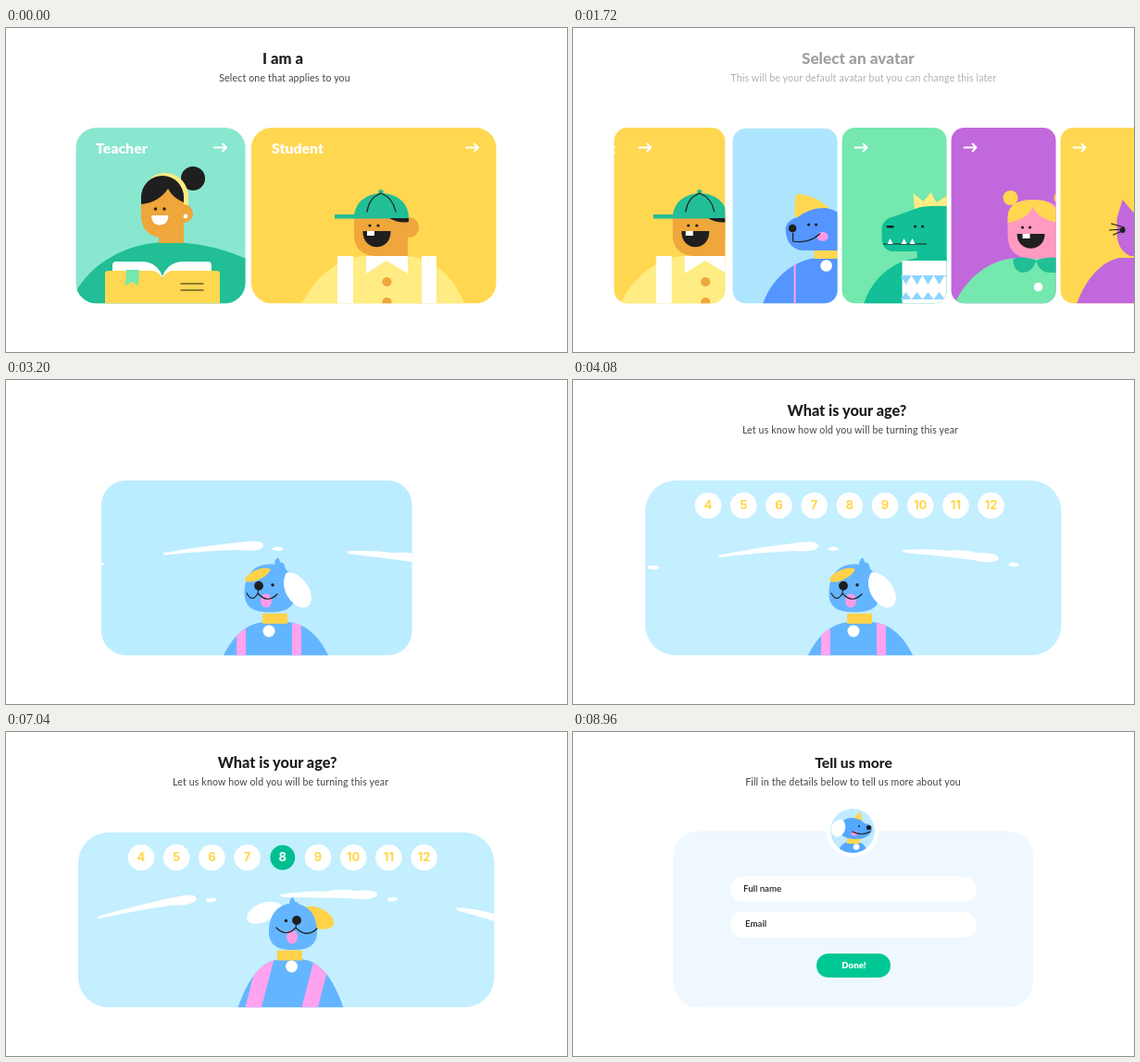
These frames come from a looping animation (606 px wide and 351 px high, 9000 ms). An HTML page:

```html
<!DOCTYPE html>
<html lang="en">
<head>
<meta charset="utf-8">
<title>Onboarding</title>
<style>
html, body { margin: 0; width: 100%; height: 100%; overflow: hidden; background: #fff; }
svg { display: block; width: 606px; height: 351px; font-family: Lato, "Open Sans", sans-serif; }
.title { font-weight: 800; fill: #1c1c1c; text-anchor: middle; }
.sub { font-size: 10.6px; letter-spacing: .15px; fill: #444; text-anchor: middle; }
.role { font-size: 15.8px; font-weight: 900; fill: #fff; }
.num { font: 700 13px Inter, sans-serif; text-anchor: middle; }
.field { font-size: 9.7px; font-weight: 600; fill: #222; }
.done { font-size: 9.6px; font-weight: 900; fill: #fff; text-anchor: middle; }
.line { fill: none; stroke: #1f1f1f; stroke-width: 1.2; stroke-linecap: round; }
.arrow { fill: none; stroke: #fff; stroke-width: 2; stroke-linecap: round; stroke-linejoin: round; }
</style>
</head>
<body>
<svg id="stage" viewBox="0 0 606 351"></svg>
<script>
const LOOP = 9000, SPAN = 1733, STARTS = [463, 2254, 6950];
const INK = '#1f1f1f', SKIN = '#efa63b', GREEN = '#22be95', YELLOW = '#ffd751', BLUE = '#64b5ff';

const clamp = v => Math.max(0, Math.min(1, v));
const lerp = (a, b, p) => a + (b - a) * p;
const ramp = (t, from, to) => clamp((t - from) / (to - from));
const smooth = p => p * p * (3 - 2 * p);
const quart = u => u < .5 ? 8 * u ** 4 : 1 - 8 * (1 - u) ** 4;
const mix = (a, b, p) => `rgb(${a.map((v, i) => Math.round(lerp(v, b[i], p)))})`;

const path = (d, fill) => `<path d="${d}" fill="${fill}"/>`;
const line = d => `<path class="line" d="${d}"/>`;
const dot = (x, y, r, fill = INK, id = '') => `<circle cx="${x}" cy="${y}" r="${r}" fill="${fill}" ${id && `id="${id}"`}/>`;
const box = (x, y, w, h, fill, r = 0) => `<rect x="${x}" y="${y}" width="${w}" height="${h}" rx="${r}" fill="${fill}"/>`;
const oval = (x, y, rx, ry, fill) => `<ellipse cx="${x}" cy="${y}" rx="${rx}" ry="${ry}" fill="${fill}"/>`;
const arrow = id => `<path class="arrow" id="${id}" d="M-6 0H7M3 -4L7 0L3 4"/>`;
const card = (id, fill, art, extra = '') => `
  <clipPath id="clip-${id}"><rect id="mask-${id}"/></clipPath>
  <g clip-path="url(#clip-${id})"><rect id="bg-${id}" y="107" width="606" height="192" fill="${fill}"/>
  <g id="art-${id}">${art}</g>${extra}</g>`;

const teacher = dot(202, 163, 13) +
  path('M66 310C78 258 130 232 172 232C215 232 250 242 290 266V310Z', GREEN) +
  path('M147 182A25 26 0 0 1 197 184V195H150Z', '#ffec82') +
  box(165, 215, 27, 18, SKIN) +
  path('M146 182Q152 168 171 168Q192 170 192 186V227H168Q146 225 146 203Z', SKIN) +
  dot(192, 201, 10, SKIN) + dot(194, 204, 2.4, '#fff') +
  path('M146 191V183A23 23 0 0 1 192 183V189Q180 184 175 174Q165 189 146 191Z', INK) +
  dot(161.5, 196, 1.7) + dot(171, 196, 1.7) +
  path('M157 203H175.5Q175 213.5 166 213.5Q157 213 157 203Z', '#fff') +
  path('M115 270V257Q115 253 119 253H146Q163 253 169 269Q175 253 192 253H218Q222 253 222 257V270Z', '#fff') +
  path('M107 300V266Q107 263 110 263H159Q165 264 169 271Q173 264 179 263H228Q231 263 231 266V300Z', YELLOW) +
  path('M130 262H144L143 279L136 275L129 279Z', '#74e8ae') +
  line('M189 277H213M189 284H213');

const student = path('M318 301C337 263 365 247 390 247H430C460 247 485 270 496 301Z', '#ffec82') +
  box(358, 247, 17, 53, '#fff') + box(449, 247, 16, 53, '#fff') +
  dot(435, 216, 11, SKIN) +
  path('M376 200H434V247H398Q376 245 376 224Z', SKIN) +
  path('M389 247H434V266L411 252L389 266Z', '#fff') +
  dot(411.5, 275, 5, SKIN) + dot(411.5, 297, 5, SKIN) +
  path('M414 206H435V210Q425 212 414 206Z', INK) +
  path('M376 206C376 170 435 170 435 206Z', GREEN) + box(355, 202, 60, 4.5, GREEN) + dot(405, 177.5, 2.6, GREEN) +
  line('M390 199Q392 184 405 179Q418 184 421 199') +
  dot(393, 214, 1.6) + dot(402, 214, 1.6) +
  path('M385.5 220H415.5C416 243 385 243 385.5 220Z', INK) + box(390, 220, 8, 5, '#fff');

const sideDog = path('M186 300C196 270 222 250 246 249H272C300 252 320 270 330 300Z', '#5595ff') +
  box(220, 255, 2, 44, '#ffa3f0') + box(268, 252, 2, 47, '#ffa3f0') +
  box(242, 238, 31, 12, YELLOW) + dot(255, 257.5, 6.3, '#fff') +
  path('M221 205Q220 186 223 180Q242 180 258 195L244 206Z', YELLOW) +
  path('M211 216Q213 208 224 205Q238 194 254 195Q276 198 277 220V241H228Q211 238 211 216Z', '#5595ff') +
  oval(251, 226, 6, 5, '#ff9be6') + line('M219 222V231Q236 234 248 223') +
  dot(218.5, 217, 4.3) + dot(236, 213, 1.6) + dot(244, 213, 1.6) +
  oval(277, 213, 9, 18, '#fff');

const zigzag = (y, n) => path(`M366 ${y}` + Array.from({ length: n }, (_, i) => `l6 ${y > 285 ? -8 : 10}l6 ${y > 285 ? 8 : -10}`).join('') + 'Z', '#8fd4ff');
const dino = path('M326 300C336 270 358 252 386 249H440V300Z', '#12bf96') +
  path('M382 206L380 179L391 188L399 178L405 189L417 181V206Z', '#ffec82') +
  path('M346 216Q348 206 360 204L382 196Q390 192 416 193H440V254H384V242H356Q347 240 346 229Z', '#12bf96') +
  path('M368 252H440V300H368Z', '#fff') + zigzag(268, 7) + zigzag(294, 7) +
  line('M348 234H394') +
  path('M352 234l3 -6l3 6ZM367 234l3 -6l3 6ZM376 234l3 -6l3 6Z', '#fff') +
  box(351, 214, 8, 2.5, INK, 1) + dot(382, 215, 1.6) + dot(390, 215, 1.6);

const girl = path('M424 300C438 268 466 249 494 249H540C560 252 580 280 586 300Z', '#74e8ae') +
  dot(485, 184, 8, YELLOW) + dot(540, 184, 8, YELLOW) +
  path('M482 206Q482 186 510 186Q538 186 538 206V250H506Q482 248 482 224Z', '#ff9ac0') +
  path('M482 211V204Q483 186 510 186Q538 186 538 211Q516 208 509 194Q502 208 482 211Z', YELLOW) +
  path('M488 250Q500 246 513 252Q508 266 497 265Q487 262 488 250ZM513 252Q527 246 540 250V265H527Q515 264 513 252Z', GREEN) +
  dot(498, 216, 1.6) + dot(506, 216, 1.6) +
  path('M492 223H522C522 244 492 244 492 223Z', INK) + box(498, 223, 8, 5, '#fff') + dot(515, 280.5, 4.8, '#fff');

const cat = path('M556 300C566 272 582 254 602 249H660V300Z', '#c168dc') +
  path('M600 206L606 186L618 200H650V247H614Q600 240 600 222Z', '#c168dc') +
  dot(606, 219, 3) + line('M594 212L608 216M592 219L606 218M596 224L608 219');

const leaf = 'M-20 0C-20 -12 10 -17 20 0C14 14 -18 13 -20 0Z';
const clouds = path('M157 190Q200 181 250 175.5Q266 174 265 181Q262 187 238 185Q200 187 160 192Q157 193 157 190Z', '#fff') +
  oval(281, 183, 6, 2.2, '#fff') +
  path('M355 184Q385 182 405 185Q420 183 436 187Q461 187 460 194Q455 200 432 195Q400 191 358 187Z', '#fff') +
  oval(476, 200, 5.5, 2.3, '#fff') + oval(87, 203, 6.5, 2.3, '#fff') +
  path('M543 215Q570 218 610 236Q600 242 580 232L546 219Z', '#fff');
const frontDog = `
  <clipPath id="clip-body"><path id="bodyMask"/></clipPath>
  <path id="body" fill="${BLUE}"/>
  <path id="straps" fill="#ffa3f0" clip-path="url(#clip-body)"/>
  <rect id="collar" width="27" height="11" fill="#ffd24a"/>${dot(0, 0, 6.5, '#fff', 'tag')}
  <path id="tuft" d="M-10 5Q-7 -3 -3 0Q-3 -7 1 -8Q3 -5 3 -3Q8 -4 9 5Z" fill="${BLUE}"/>
  <path id="head" fill="${BLUE}"/>
  <g id="ears"><path id="earL" d="${leaf}"/><path id="earR" d="${leaf}"/></g>
  <ellipse id="tongue" rx="6" ry="7.5" fill="#ff9be6"/>
  <path id="mouth" class="line"/>
  ${dot(0, 0, 1.7, INK, 'eyeL')}${dot(0, 0, 1.7, INK, 'eyeR')}${dot(0, 0, 4.9, INK, 'nose')}`;
const numbers = Array.from({ length: 9 }, (_, i) => `<g id="n${i}">
  ${dot(146 + 38.2 * i, 136, 14.3, '#fff', 'ring' + i)}
  <text class="num" id="digit${i}" x="${146 + 38.2 * i}" y="140" fill="#ffd54a">${i + 4}</text></g>`).join('');

const badge = dot(302, 107, 28.5, '#fff') + `<clipPath id="clip-badge"><circle cx="302" cy="107" r="24"/></clipPath>
  <g clip-path="url(#clip-badge)">${dot(302, 107, 24, '#bfeaff')}
  ${path('M284 134Q288 120 298 119H309Q317 122 320 134Z', '#55a8ff')}${box(296, 115, 14, 6, YELLOW)}${dot(306, 124.5, 3.3, '#fff')}
  ${path('M303 94L310 86L313 96Z', YELLOW)}
  ${path('M288 104Q290 93 302 93Q311 94 315 99Q324 100 323 106Q320 116 305 116Q288 116 288 104Z', '#55a8ff')}
  ${oval(304, 110, 3.5, 2.5, '#ff9be6')}${line('M302 108Q312 113 321 108')}${dot(319.5, 103.5, 2.6)}${dot(309, 102, 1)}
  <path d="${leaf}" fill="#fff" transform="translate(287 104) rotate(-70) scale(.5 .7)"/></g>`;

const heads = [
  ['I am a', 16.7, 299, 'Select one that applies to you', 301],
  ['Select an avatar', 17.2, 300, 'This will be your default avatar but you can change this later', 306],
  ['What is your age?', 16.3, 296, 'Let us know how old you will be turning this year', 299.5],
  ['Tell us more', 15.7, 303, 'Fill in the details below to tell us more about you', 302.5]
].map(([title, size, x, sub, subX], i) => `<g id="head${i}">
  <text class="title" font-size="${size}" x="${x}" y="39">${title}</text>
  <text class="sub" x="${subX}" y="58">${sub}</text></g>`).join('');

document.getElementById('stage').innerHTML = heads +
  card('teacher', '#89e7cf', teacher, `<g id="teacherLabel"><text class="role" x="97" y="136">Teacher</text><g transform="translate(231 129.5)">${arrow('teacherArrow')}</g></g>`) +
  card('cat', YELLOW, cat, arrow('arrow-cat')) +
  card('girl', '#c168dc', girl, arrow('arrow-girl')) +
  card('dino', '#74e8ae', dino, arrow('arrow-dino')) +
  card('student', YELLOW, student, `<text class="role" id="studentLabel" y="136">Student</text>` + arrow('arrow-student')) +
  card('dog', '#ade5ff', sideDog, `<g id="clouds">${clouds}</g><g id="frontDog">${frontDog}</g>${numbers}`) +
  `<g id="form"><g id="f0">${box(170, 156.5, 266, 27.5, '#fff', 13.7)}<text class="field" x="184" y="173">Full name</text></g>
  <g id="f1">${box(170, 194.5, 266, 28.5, '#fff', 14.2)}<text class="field" x="186" y="211">Email</text></g>
  <g id="f2">${box(263, 240, 80, 26, '#00c895', 13)}<text class="done" x="303.5" y="256">Done!</text></g></g>
  <g id="badge">${badge}</g>`;

const els = {};
document.querySelectorAll('#stage [id]').forEach(el => els[el.id] = el);
const set = (id, attrs) => { for (const k in attrs) els[id].setAttribute(k, attrs[k]); };
const move = (id, x, y = 0, rest = '') => set(id, { transform: `translate(${x} ${y}) ${rest}` });
const fade = (id, opacity) => set(id, { opacity });
const place = (id, x, width, rx, artX, y = 108) => {
  set('mask-' + id, { x, y, width, height: 298.3 - y, rx });
  move('art-' + id, artX);
};

// Head looking left, ahead and right.
const poses = [
  { head: [304, 225.5, 27.5, 26], nose: [292, 223], eyes: [291, 223, 307, 222], mouth: [279, 231, 291, 231, 312, 232], tongue: [300, 239],
    earL: [291, 211, .75, .5, -25], earR: [333.5, 227, 1.08, 1.15, 237], neck: [296, 253, 303, 272], body: [254, 367, 262], straps: [268, 328, 10, 0] },
  { head: [308, 217, 24.5, 26], nose: [306, 210.5], eyes: [300, 211, 315.5, 211], mouth: [288, 219, 306, 221, 324, 220], tongue: [305, 229],
    earL: [281, 197, 1, .95, -5], earR: [341, 209, 1, 1.15, 218], neck: [293.5, 242, 306.5, 261.5], body: [252, 363, 252], straps: [267, 330, 17.5, 0] },
  { head: [310, 211, 26, 25], nose: [314, 204], eyes: [302.5, 204.5, 317, 204], mouth: [292, 212, 313, 212, 336, 213], tongue: [309, 222],
    earL: [279, 195.5, 1, .95, -25], earR: [336, 200.5, .98, 1, 205], neck: [293, 236.5, 308.5, 254], body: [251, 364, 246], straps: [258, 319, 17.5, 15] }
];

function headShape(x, y, rx, ry) {
  const side = s => `C${x + s * .75 * rx} ${y - ry} ${x + s * rx} ${y - .35 * ry} ${x + s * rx} ${y + .2 * ry}C${x + s * rx} ${y + .8 * ry} ${x + s * .65 * rx} ${y + ry} ${x} ${y + ry}`;
  return [1, -1].map(s => `M${x} ${y - ry}${side(s)}Z`).join('');
}

function drawDog(t) {
  const late = t > 5440, p = late ? smooth(ramp(t, 5440, 7000)) : smooth(ramp(t, 4720, 5400));
  const from = poses[+late], to = poses[1 + late];
  const at = key => from[key].map((v, i) => lerp(v, to[key][i], p));
  const [hx, hy, rx, ry] = at('head'), [nx, ny] = at('nose'), [ax, ay, bx, by] = at('eyes');
  const [mx, my, cx, cy, ex, ey] = at('mouth'), [tx, ty] = at('tongue'), [kx, ky, gx, gy] = at('neck');
  const [left, right, top] = at('body'), [s1, s2, sw, slant] = at('straps');
  set('head', { d: headShape(hx, hy, rx, ry) });
  move('tuft', hx + lerp(8, -1, late ? 1 : p), hy - ry + 1);
  set('nose', { cx: nx, cy: ny });
  set('eyeL', { cx: ax, cy: ay });
  set('eyeR', { cx: bx, cy: by });
  set('tongue', { cx: tx, cy: ty });
  set('mouth', { d: `M${mx} ${my}Q${(mx + cx) / 2} ${cy + 11} ${cx} ${cy}Q${(cx + ex) / 2} ${cy + 12} ${ex} ${ey}M${cx} ${cy}L${nx} ${ny}` });
  set('collar', { x: kx, y: ky });
  set('tag', { cx: gx, cy: gy });
  const hip = lerp(300, top, .6);
  const d = `M${left - 1} 300C${left + 10} ${hip} ${left + 25} ${top} ${left + 48} ${top}H${right - 48}C${right - 25} ${top} ${right - 10} ${hip} ${right + 1} 300Z`;
  set('body', { d });
  set('bodyMask', { d });
  const strap = x => `M${x} 300h${sw}l${slant} -58h${-sw}Z`;
  set('straps', { d: strap(s1) + strap(s2) });
  const swapped = t > 6240;
  for (const id of ['earL', 'earR']) {
    const [x, y, sx, sy, turn] = at(id);
    move(id, x, y, `rotate(${turn}) scale(${sx} ${sy})`);
    set(id, { fill: (id === 'earL') !== swapped ? '#ffd24a' : '#fff' });
  }
  // Ears overlap the face only while it is turned left.
  els[late || p > .5 ? 'head' : 'tongue'].before(els.ears);
}

function cloudShift(t) {
  if (t < 4720) return lerp(12, -8, ramp(t, 3300, 4520)) + .8;
  return t < 5440 ? lerp(-7.2, -40, smooth(ramp(t, 4720, 5440))) : lerp(-40, -60, ramp(t, 5440, 7100));
}

function draw(t) {
  const us = STARTS.map(s => ramp(t, s, s + SPAN));
  const [a, b, c] = us.map(quart);

  for (let i = 0; i < 4; i++) {
    const enter = i ? ramp(us[i - 1], .6, .9) : 1, leave = i < 3 ? us[i] : 0;
    fade('head' + i, enter * (1 - ramp(leave, .07, .42)));
    move('head' + i, 40 * (1 - enter) ** 3 - 55 * leave);
  }

  place('teacher', lerp(75.5, -198, a), lerp(183, 116, a), lerp(22, 15, a), -191 * a);
  fade('teacherLabel', 1 - ramp(a, .01, .16));
  move('teacherLabel', -300 * a);

  const sx = lerp(lerp(265, 34, a), -323, b);
  place('student', sx, lerp(264.5, 113, a), lerp(22, 14, a), -281 * a + sx - lerp(265, 34, a));
  set('studentLabel', { x: lerp(287, -24, a) });
  move('arrow-student', lerp(503, 57, a) + sx - lerp(265, 34, a), 129.5);

  [['dino', 270, 303], ['girl', 388, 421], ['cat', 506, 539]].forEach(([id, rest, drawn], i) => {
    const x = lerp(lerp(726 + 118 * i, rest, a), rest + 786, b);
    place(id, x, 113, 14, x - drawn);
    move('arrow-' + id, x + 20, 129.5);
  });

  const enterX = lerp(608, 152, a), age = ramp(b, .35, .65), out = 1 - ramp(us[2], .1, .4);
  place('dog', lerp(lerp(enterX, 78, b), 108.5, c), lerp(lerp(113, 449.5, b), 388.5, c), lerp(lerp(14, 33, b), 27, c),
    lerp(enterX, 210, b) - 154, lerp(108.8, 107.5, c));
  fade('art-dog', ramp(a, .3, .7) * (1 - age));
  set('bg-dog', { fill: c ? mix([195, 239, 255], [238, 248, 254], c) : mix([173, 229, 255], [195, 239, 255], b) });

  fade('clouds', ramp(b, .02, .3) * out);
  move('clouds', 0, -5 * ramp(t, 5440, 7100), `rotate(${cloudShift(t) / 655 * 180 / Math.PI} 293 840)`);
  drawDog(t);
  fade('frontDog', age * (1 - ramp(c, .35, .75)));
  const size = lerp(1, .42, c);
  move('frontDog', lerp(308, 302, c) - 56 * (1 - b), lerp(235, 108, c), `scale(${size}) translate(-308 -235)`);

  for (let i = 0; i < 9; i++) {
    const show = ramp(us[1], .62 + .025 * i, .76 + .025 * i);
    fade('n' + i, show * out);
    move('n' + i, 0, -12 * (1 - show) ** 2);
  }
  const picked = smooth(ramp(t, 4760, 4960));
  set('ring4', { fill: mix([255, 255, 255], [0, 190, 145], picked), r: lerp(14.3, 13.4, picked) });
  set('digit4', { fill: mix([255, 213, 74], [255, 255, 255], picked) });

  const pop = ramp(c, .4, .85);
  fade('badge', pop);
  move('badge', 302, lerp(150, 107, smooth(pop)), `scale(${lerp(1.5, 1, smooth(pop))}) translate(-302 -107)`);
  for (let i = 0; i < 3; i++) {
    const show = ramp(t, 8150 + 140 * i, 8550 + 140 * i);
    fade('f' + i, show);
    move('f' + i, 0, 10 * (1 - show) ** 3);
  }
}

const begun = performance.now();
function tick() {
  draw((performance.now() - begun) % LOOP);
  requestAnimationFrame(tick);
}
tick();
</script>
</body>
</html>
```
